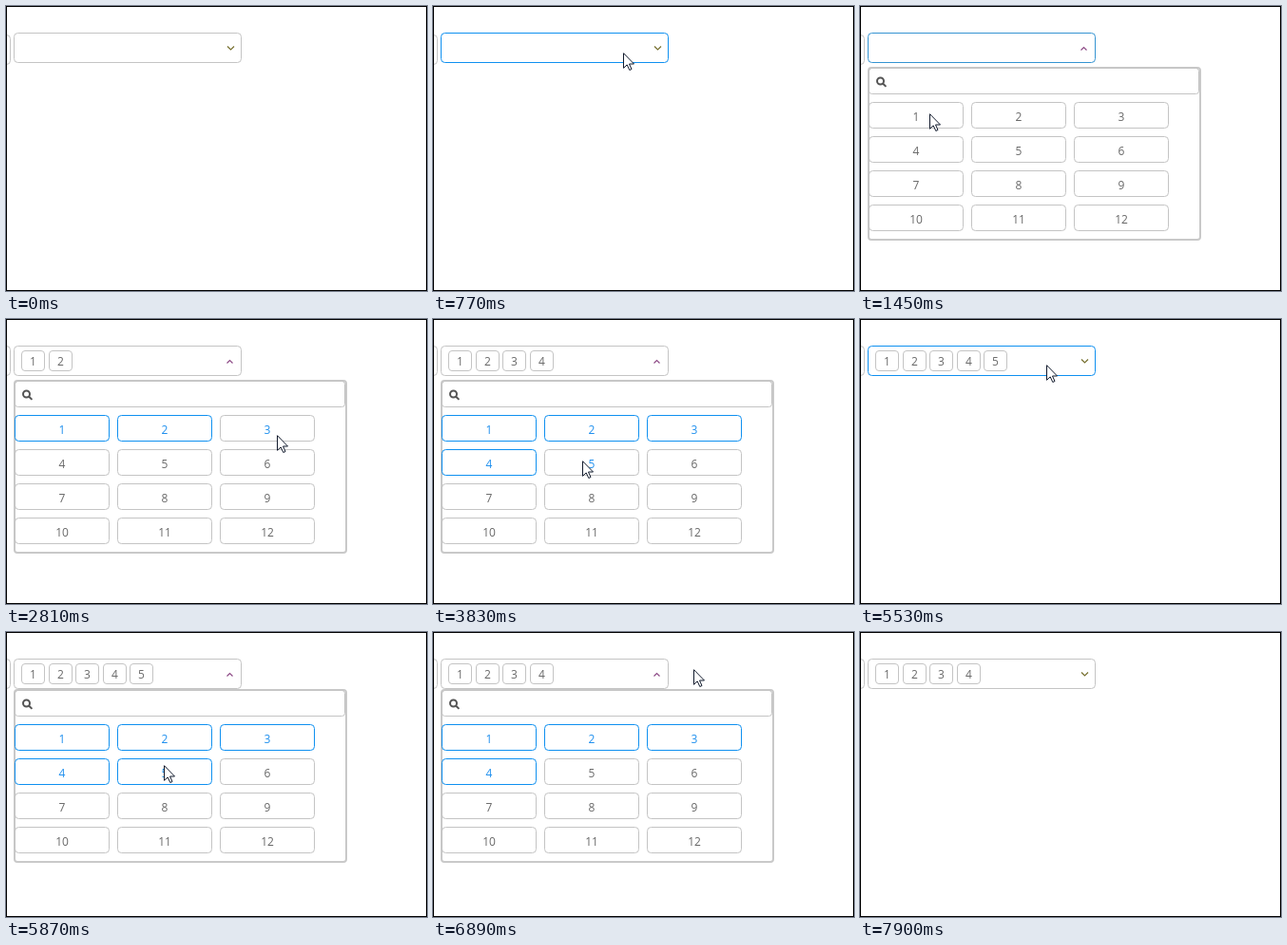
Animation, 443 px wide and 300 px high, one loop 8.58 s. Source, as an HTML page:

```html
<!DOCTYPE html>
<html lang="en">
<head>
<meta charset="utf-8">
<title>Multi select</title>
<style>
  html, body { margin: 0; width: 100%; height: 100%; overflow: hidden; background: #fff; }
  svg { display: block; width: 443px; height: 300px; }
  rect, path, circle { fill: none; }
  text { font: 12px "Open Sans", "Noto Sans", sans-serif; text-anchor: middle; fill: #686868; }
</style>
</head>
<body>
<svg id="stage" viewBox="0 0 443 300"></svg>
<script>
const LOOP = 8580;
const GRAY = '#c4c4c4', BLUE = '#0f90f0', TEXT = '#686868', TEXT_ON = '#1e8fee';

// Each step overrides part of the state before it.
const steps = [
  { t: 0, at: null, tags: 0, marked: 0, lit: 0, edge: GRAY, panel: 'closed', lift: 0, arrow: 'down', side: 2 },
  { t: 100, at: [204, 51], edge: '#6fb6e8' },
  { t: 770, at: [200, 49], edge: BLUE },
  { t: 1110, panel: 'open', arrow: 'up' },
  { t: 1450, at: [73, 113], edge: '#3594d2' },
  { t: 1790, tags: 1, lit: 1, edge: GRAY, side: 0 },
  { t: 2130, at: [158, 113], marked: 1 },
  { t: 2470, at: [279, 131], tags: 2, lit: 2 },
  { t: 2810, at: [285, 122], marked: 2, lit: 3 },
  { t: 3150, at: [80, 151], tags: 3, marked: 3 },
  { t: 3490, at: [158, 148], tags: 4, lit: 4 },
  { t: 3830, at: [157, 149], marked: 4, lit: 5 },
  { t: 4170, at: [223, 147], tags: 5, marked: 4.5 },
  { t: 4510, at: [289, 28], marked: 5 },
  { t: 4850, panel: 'fading', arrow: 'turning' },
  { t: 5190, at: [200, 47], panel: 'closed', arrow: 'down' },
  { t: 5530, at: [196, 48], edge: BLUE },
  { t: 5870, at: [166, 140], edge: GRAY, panel: 'open', lift: -4, arrow: 'up' },
  { t: 6210, at: [167, 150], tags: 4 },
  { t: 6550, at: [250, 48], marked: 4 },
  { t: 6890, at: [274, 39], lit: 4 },
  { t: 7240, panel: 'closed', arrow: 'turning' },
  { t: 7560, arrow: 'down' },
  { t: 7900, at: null }
];
const states = [];
steps.reduce((prev, step) => {
  const next = { ...prev, ...step };
  states.push(next);
  return next;
}, {});

const arrows = {
  down: ['M233 42.5 L236.5 46 L240 42.5', '#77702f'],
  up: ['M232.5 46.5 L235.5 43.5 L238.5 46.5', '#8d4a86'],
  turning: ['M235.2 41.5 V45.3 H240', '#888']
};

const stage = document.getElementById('stage');

function add(parent, tag, attrs = {}, label) {
  const el = document.createElementNS('http://www.w3.org/2000/svg', tag);
  set(el, attrs);
  if (label !== undefined) el.textContent = label;
  return parent.appendChild(el);
}
function set(el, attrs) {
  for (const key in attrs) el.setAttribute(key, attrs[key]);
}
function box(parent, x, y, width, height, rx, stroke = GRAY) {
  return add(parent, 'rect', { x, y, width, height, rx, stroke });
}
function show(el, on) {
  el.style.display = on ? '' : 'none';
}
function mix(a, b, k) {
  const part = i => {
    const p = parseInt(a.substr(i, 2), 16), q = parseInt(b.substr(i, 2), 16);
    return Math.round(p + (q - p) * k);
  };
  return `rgb(${[1, 3, 5].map(part)})`;
}

const side = box(stage, -30.5, 28.5, 35, 31, 4);
const field = box(stage, 8.5, 28.5, 239, 31, 4);
const arrow = add(stage, 'path', { 'stroke-width': 1.2 });

const tags = Array.from({ length: 5 }, (_, i) => {
  const g = add(stage, 'g');
  const x = Math.floor(16.5 + 28.5 * i);
  box(g, x + 0.5, 33.5, 24, 21, 3.5);
  add(g, 'text', { x: x + 12.5, y: 49 }, i + 1);
  return g;
});

const panel = add(stage, 'g');
const frame = add(panel, 'g');
set(box(frame, 9, 65, 349, 181, 3, '#c9c9c9'), { 'stroke-width': 2 });
box(frame, 9.5, 65.5, 347, 27, 3);
const lens = add(panel, 'g', { stroke: '#555', 'stroke-width': 2 });
add(lens, 'circle', { cx: 21.5, cy: 79, r: 3.5 });
add(lens, 'path', { d: 'M24.2 81.7 L27.4 84.9' });

const options = Array.from({ length: 12 }, (_, i) => {
  const x = 9 + 108 * (i % 3), y = 101 + 36 * Math.floor(i / 3);
  return {
    rim: box(panel, x + 0.5, y + 0.5, 99, 27, 4),
    label: add(panel, 'text', { x: x + 50, y: y + 20 }, i + 1)
  };
});

const cursor = add(stage, 'path', {
  d: 'M.5 .7 V16.3 L4.2 12.9 L6.8 18.5 L9 17.5 L6.5 12 H11.5 Z',
  stroke: '#111a2c', style: 'fill: #fff'
});
box(stage, 0.5, 0.5, 442, 299, 0, '#000');

function draw(s) {
  set(side, { transform: `translate(0 ${s.side})` });
  set(field, { stroke: s.edge });
  const [d, stroke] = arrows[s.arrow];
  set(arrow, { d, stroke });
  tags.forEach((tag, i) => show(tag, i < s.tags));

  const fading = s.panel === 'fading';
  show(panel, s.panel !== 'closed');
  show(frame, !fading);
  set(panel, { transform: `translate(0 ${s.lift})`, opacity: fading ? 0.45 : 1 });
  options.forEach(({ rim, label }, i) => {
    const k = Math.max(0, Math.min(1, s.marked - i));
    show(rim, !fading || k > 0);
    set(rim, { stroke: mix(GRAY, BLUE, k) });
    label.style.fill = i < s.lit ? TEXT_ON : TEXT;
  });

  show(cursor, s.at);
  if (s.at) set(cursor, { transform: `translate(${s.at})` });
}

const start = performance.now();
let shown;
function tick() {
  const t = Math.max(0, performance.now() - start) % LOOP;
  const state = states.filter(s => s.t <= t).pop();
  if (state !== shown) draw(shown = state);
  requestAnimationFrame(tick);
}
tick();
</script>
</body>
</html>
```
